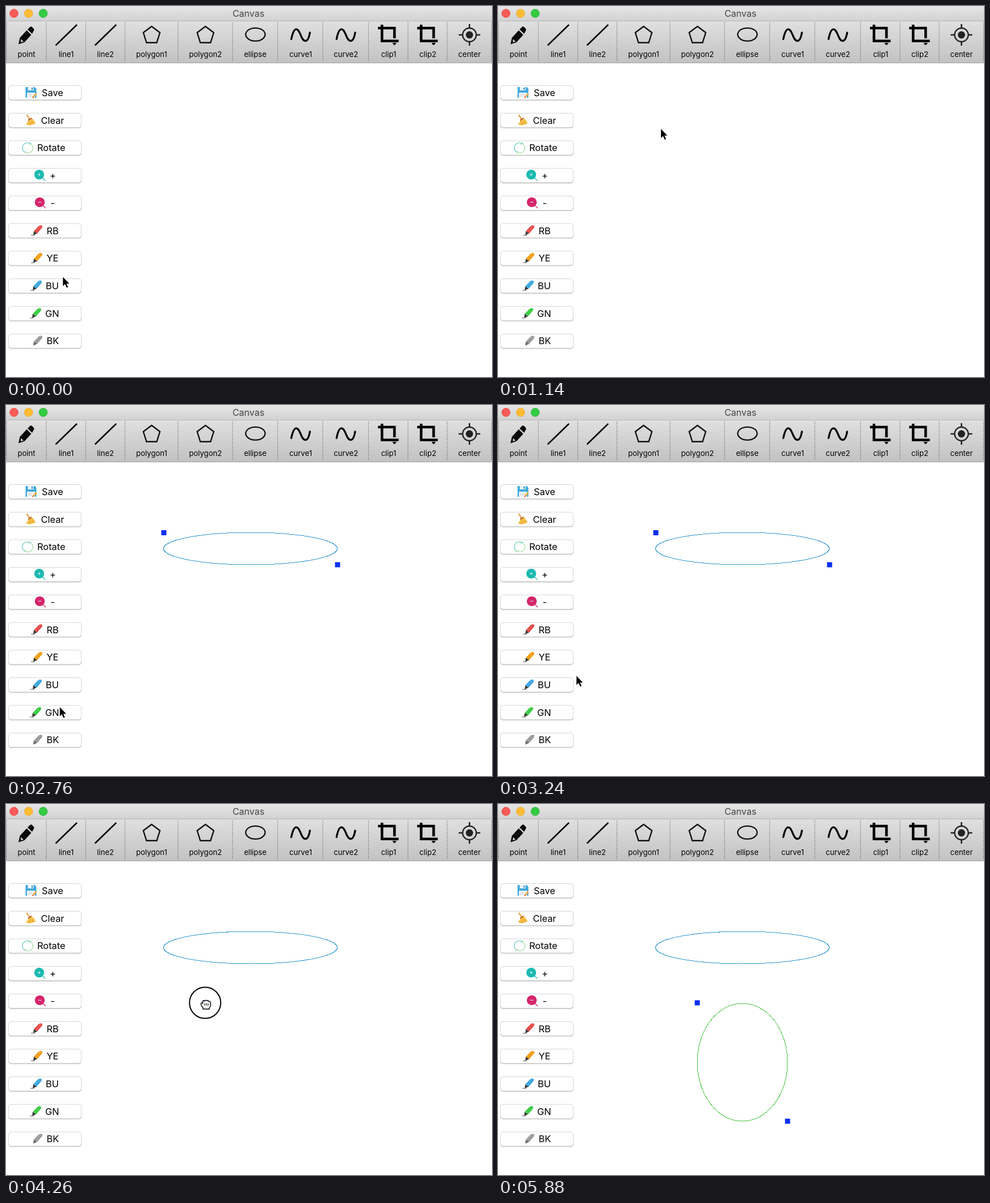
Write an HTML page that moves like this. It is 856 px wide and 655 px high and loops after 5940 ms.

```html
<!DOCTYPE html>
<html lang="en">
<head>
<meta charset="utf-8">
<title>Canvas</title>
<style>
html, body { margin: 0; width: 100%; height: 100%; overflow: hidden; background: #fff; }
svg { display: block; font-family: Inter, Roboto, sans-serif; }
</style>
</head>
<body>
<svg id="stage" width="856" height="655" viewBox="0 0 856 655"></svg>
<script>
const stage = document.getElementById('stage');

const gradient = (id, top, bottom) => `<linearGradient id="${id}" x2="0" y2="1">
  <stop stop-color="${top}"/><stop offset="1" stop-color="${bottom}"/></linearGradient>`;
const path = (d, fill, stroke = 'none', width = 1, more = '') =>
  `<path d="${d}" fill="${fill}" stroke="${stroke}" stroke-width="${width}" ${more}/>`;
const line = (d, color, width, more) => path(d, 'none', color, width, more);
const circle = (x, y, r, fill, more = '') => `<circle cx="${x}" cy="${y}" r="${r}" fill="${fill}" ${more}/>`;
const at = (x, y, body, more = '') => `<g transform="translate(${x} ${y})" ${more}>${body}</g>`;

// Toolbar icons, drawn around their own centre
const round = 'stroke-linecap="round"';
const pencil = path('M-14 16.5L-11.5 5L.5 -8L8.5 0L-3.5 13Z', '#0a0a0a') +
  path('M2 -9.5L6 -13.8Q8 -15.8 10 -13.8L12.8 -11Q14.5 -9 12.8 -7L10 -2Z', '#0a0a0a') +
  path('M-9.5 7.5L-5 11.8L-10 13Z', '#d0d0d0');
const slash = line('M-18.5 18.5L19 -18', '#000', 2.5);
const pentagon = line('M0 -15L14.6 -4L9 13.8H-9L-14.6 -4Z', '#111', 2.4);
const oval = '<ellipse cx=".3" cy="-.7" rx="17.1" ry="11.5" fill="none" stroke="#111" stroke-width="2.3"/>';
const wave = line('M-16.5 7.5C-14 -5 -11.5 -9.8 -8 -9.8C0 -9.8 0 10.7 8.5 10.7C12 10.7 14.5 6 16.3 -4', '#000', 3.3, round);
const crop = line('M-11.8 -18V10.8H17.5M-18.8 -12H10.2V6', '#000', 4.6) + path('M6.5 14H14L11.2 17.8H9Z', '#000');
const aim = circle(0, 0, 12, 'none', 'stroke="#222" stroke-width="2.4"') + circle(0, 0, 6.4, '#222') +
  line('M0 -19V-12M0 12V19M-19 0H-12M12 0H19', '#222', 2.6);
const tools = [
  ['point', 36, pencil], ['line1', 106, slash], ['line2', 175.2, slash],
  ['polygon1', 256.5, pentagon], ['polygon2', 351.3, pentagon], ['ellipse', 439, oval],
  ['curve1', 519, wave], ['curve2', 598.7, wave], ['clip1', 674, crop], ['clip2', 743, crop],
  ['center', 816.3, aim]
];
const dividers = [.7, 71, 140.5, 209.5, 303, 399, 478.5, 558, 638.5, 708, 777, 855.3];

// Button icons
const disk = path('M-9.5 -10H6.5L9.5 -7V9H-9.5Z', '#3fa9e0') + path('M-5.5 -10H4.5V-4H-5.5Z', '#eef6fb') +
  path('M1 -9H3V-5H1Z', '#3b8fc0') + path('M-7 0H7V9H-7Z', '#f6f6f6') +
  line('M-5 3H3M-5 6H2', '#c4ced4', 1) + line('M4 7.5L9.5 1.5', '#f3b040', 2.6) + path('M2 10L3 6.5L5.5 8.5Z', '#e05a42');
const broom = line('M-6 -9L-1.5 -2', '#e39a3c', 2.2, round) +
  path('M-4 0L2 -4Q8 1 9 6L-1 9Q-6 9 -8 6Q-4 4 -4 0Z', '#f4bd45') +
  line('M-4 0L2 -4', '#b5532f', 1.8) + line('M-1 8L0 4M4 7L3 2', '#d99a2b', .8);
const turn = line('M-4 7.9A8.8 8.8 0 0 1 3 -8.3', '#74cfc6', 1.4) + line('M4 -7.9A8.8 8.8 0 0 1 -3 8.3', '#b4e2ae', 1.4) +
  line('M3 -5V-8.3H6.5', '#74cfc6', 1.2) + line('M-3 5V8.3H-6.5', '#b4e2ae', 1.2);
const lens = (color, sign) => line('M5 4.5L9 8.5', color, 2, round + ' opacity=".75"') +
  circle(-1, -1.5, 8.7, color) + line(sign, '#d9eeee', 1);
const marker = (color, tip, ground) => path('M3 -7.5L6.5 -9.5L10 -8.5L9.5 -5L1 5L-5 1Z', color) +
  line('M7 -8L-2 3', '#fff', .8, 'opacity=".3"') + path('M-5 1L1 5L-6 8Z', tip) +
  (ground ? line('M-10 8H-3', ground, 1.2) : '');
const buttons = [
  ['Save', 63, 44, disk], ['Clear', 61.5, 43, broom], ['Rotate', 55, 38, turn],
  ['+', 77, 59.5, lens('#1bb9b1', 'M-3.5 -1.5H1.5M-1 -4V1')], ['-', 78.5, 60.5, lens('#d5256b', 'M-4 -1.5H2')],
  ['RB', 71.5, 54, marker('#e64a47', '#383838', '#777')], ['YE', 71.5, 54, marker('#f09c13', '#383838', '#777')],
  ['BU', 70, 53, marker('#38a5df', '#383838', '#777')], ['GN', 69, 52, marker('#36cb3f', '#383838', '#777')],
  ['BK', 71.5, 54, marker('#999', '#666')]
];

const toolbar = `<rect width="856" height="26" fill="url(#title)"/><rect y="26" width="856" height="74" fill="url(#bar)"/>` +
  line('M0 26.5H856', '#b4b4b4', 1) + line('M0 100.5H856', '#a0a0a0', 1) +
  circle(14, 13, 7.5, '#fc5b57', 'stroke="#e2463f" stroke-width=".6"') +
  circle(39.7, 13, 7.5, '#fdbc35', 'stroke="#e0a028" stroke-width=".6"') +
  circle(65.5, 13, 7.5, '#33cb42', 'stroke="#27ac33" stroke-width=".6"') +
  '<text x="427" y="19" font-size="16" fill="#454545" text-anchor="middle">Canvas</text>' +
  dividers.map(x => line(`M${x} 29V98`, '#555', 1.2, 'stroke-dasharray="1.3 2.2"')).join('') +
  tools.map(([name, x, icon]) => at(x, 51, icon +
    `<text y="38.7" font-size="13.1" text-anchor="middle">${name}</text>`)).join('');

const button = ([name, textX, iconX, icon], i) => at(0, 153 + 48.72 * i,
  `<rect x="4" y="-12" width="129" height="26" rx="5" fill="#c4c4c4"/>
   <rect x="4.5" y="-12.5" width="128" height="25" rx="4.5" fill="#fff" stroke="#d6d6d6" class="face"/>` +
  at(iconX, 0, icon) + `<text x="${textX}" y="6" font-size="16.4">${name}</text>`, `id="${name}"`);

const handles = [[278, 225.5], [584, 282], [351, 351], [510, 560]];
const ellipse = (id, cx, cy, rx, ry, color) => `<ellipse id="${id}" cx="${cx}" cy="${cy}" rx="${rx}" ry="${ry}"
  fill="none" stroke="${color}" shape-rendering="crispEdges"/>`;
const arrow = path('M.8 1.5V17.5L4.5 14L7.3 20.3L9.7 19.2L7 13.2H12Z', '#000', '#fff', 1.8, 'paint-order="stroke"');
const hand = path('M-5 10V7Q-9 4 -8.5 0Q-8 -2 -5.5 0V-3Q-4.5 -6 -2 -4Q0 -7 2 -4.5Q4.5 -6 5.5 -3Q8 -4 8.5 -1V3Q8 6 6 8V10Z',
  '#fff', '#000', 1.4) + line('M-2 0V4M1 0V4M4 0V4', '#000', 1.1);

stage.innerHTML = `<defs>${gradient('title', '#e6e6e6', '#d2d2d2')}${gradient('bar', '#e0e0e0', '#c2c2c2')}
  ${gradient('pressed', '#6cb3fa', '#087eff')}</defs>` + toolbar + buttons.map(button).join('') +
  ellipse('wide', 430.5, 253.5, 153, 28.5, '#3199cf') + ellipse('tall', 430.5, 456, 79.5, 104, '#46c53f') +
  handles.map(([x, y]) => `<rect class="handle" x="${x - 4.5}" y="${y - 4.5}" width="9" height="9" fill="#0b2ff5"/>`).join('') +
  circle(0, 0, 28, 'none', 'id="ring" stroke="#000" stroke-width="2"') +
  `<g id="cursor"><g id="arrow">${arrow}</g><g id="hand" transform="translate(1 1)">${hand}</g></g>`;

// Pointer path: time, x, y
const route = [
  [60, 99.5, 477], [600, 412, 58], [720, 426.5, 55], [780, 426.5, 55], [1200, 278, 225], [1380, 278, 225],
  [1740, 583, 276.5], [1860, 584, 282], [2040, 584, 282], [2400, 112, 516], [2700, 94, 532], [2760, 94, 532],
  [2880, 94, 538], [3120, 94, 538], [3660, 438, 52.5], [3840, 438, 52.5], [4200, 351, 351], [4380, 351, 351],
  [4740, 510, 560], [4920, 510, 560], [5340, 514, 610]
];
// Presses: start, length
const presses = [[720, 60], [1260, 120], [1860, 120], [2880, 180], [3780, 60], [4260, 120], [4740, 120]];
const lifetimes = [[1260, 4260], [1860, 4260], [4260, 5940], [4740, 5940]];
const loop = 5940, step = 60;

const el = id => document.getElementById(id);
const show = (node, on) => node.setAttribute('visibility', on ? 'visible' : 'hidden');
const place = (node, x, y) => node.setAttribute('transform', `translate(${x} ${y})`);
const squares = [...document.querySelectorAll('.handle')];
const green = el('GN'), greenFace = green.querySelector('.face'), greenText = green.querySelector('text');

function pointer(t) {
  const i = route.findIndex(key => key[0] > t);
  if (i === 0) return route[0].slice(1);
  if (i < 0) return route[route.length - 1].slice(1);
  const [t0, x0, y0] = route[i - 1], [t1, x1, y1] = route[i];
  const p = (t - t0) / (t1 - t0), e = p * p * (3 - 2 * p);
  return [x0 + (x1 - x0) * e, y0 + (y1 - y0) * e];
}

function draw(t) {
  const [x, y] = pointer(t);
  const alive = lifetimes.map(([from, to]) => t >= from && t < to);
  squares.forEach((square, i) => show(square, alive[i]));
  show(el('wide'), t >= 1860);
  show(el('tall'), t >= 4740);

  const press = presses.find(([start, length]) => t >= start && t < start + length);
  show(el('ring'), press);
  if (press) {
    place(el('ring'), x - .3, y);
    el('ring').setAttribute('r', t - press[0] < step ? 27.5 : 39);
  }

  const down = t >= 2880 && t < 3060;
  greenFace.setAttribute('fill', down ? 'url(#pressed)' : '#fff');
  greenText.setAttribute('fill', down ? '#fff' : '#000');

  const seen = t < 5400;
  const over = handles.some(([hx, hy], i) => alive[i] && Math.hypot(x - hx, y - hy) < 6);
  place(el('cursor'), x, y);
  show(el('arrow'), seen && !over);
  show(el('hand'), seen && over);
}

const start = performance.now();
function tick() {
  const t = (performance.now() - start) % loop;
  draw(Math.floor(t / step) * step);
  requestAnimationFrame(tick);
}
tick();
</script>
</body>
</html>
```
